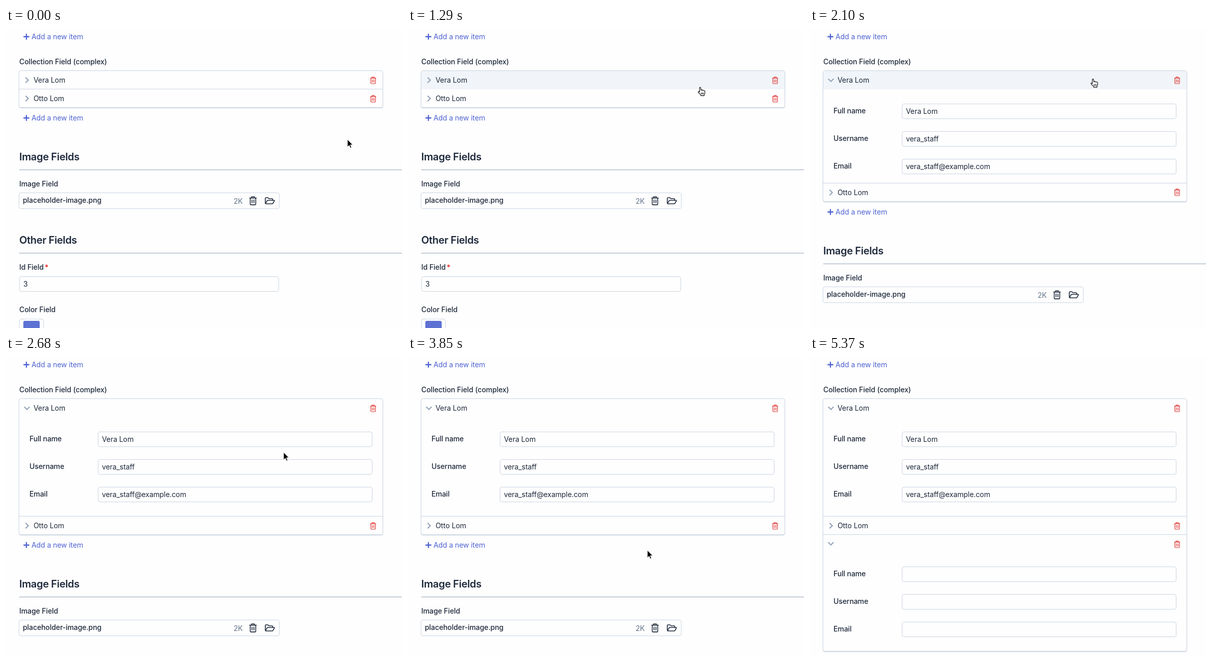
An HTML page that plays this animation: 776 px wide and 587 px high, repeating every 6.72 s.

```html
<!DOCTYPE html>
<html lang="en">
<head>
<meta charset="utf-8">
<title>Collection field</title>
<style>
  * { box-sizing: border-box; }
  html, body { margin: 0; width: 100%; height: 100%; overflow: hidden; }
  body {
    position: relative;
    padding: 83px 0 0 25px;
    background: #fefefe;
    color: #1e293b;
    font: 400 14px/20px Inter, "Open Sans", sans-serif;
    font-optical-sizing: none;
    letter-spacing: -.006em;
    white-space: nowrap;
    cursor: default;
  }
  svg { position: absolute; overflow: visible; fill: none; stroke: currentColor; }
  .label, .add, h2, hr, .input, .icon, .size, .swatch, .dot { position: absolute; margin: 0; }
  .label { font-weight: 500; }
  h2 { font-size: 20px; font-weight: 600; line-height: 28px; letter-spacing: -.017em; }
  hr { left: 1px; width: 760px; height: 1px; border: 0; background: #94a3b8; }

  .add { left: 9px; height: 20px; padding-left: 16px; color: #4f63d2; }
  .add svg { left: 0; top: 4px; width: 12px; height: 12px; stroke-width: 2.3; }
  .add.hover { color: #3a489f; }

  #list {
    position: relative;
    width: 714px;
    border: 1px solid #cbd5e1;
    border-radius: 4px;
    box-shadow: 0 1px 1px #cbd5e1;
  }
  .item + .item, #slot .item { border-top: 1px solid #cbd5e1; }
  #slot { overflow: hidden; max-height: 0; }
  .head { position: relative; height: 36px; margin-bottom: -1px; padding: 8px 28px; }
  #slot .head { height: 34px; }
  .head.hover { background: #f1f5f9; }
  .item:first-child > .head { border-radius: 3px 3px 0 0; }
  .chevron { left: 9px; top: 12px; width: 12px; height: 12px; color: #94a3b8; stroke-width: 2.1; }
  #slot .chevron { top: 11px; }
  .bin { left: 686.5px; top: 10.5px; width: 13px; height: 15px; color: #e0322f; stroke-width: 1.3; }
  .panel { position: relative; height: 0; overflow: hidden; }
  .panel .label { left: 20px; }
  .panel .input { left: 154px; width: 538px; }

  .input { height: 30px; padding-left: 7px; border: 1px solid #cbd5e1; border-radius: 4px; line-height: 28px; }
  #rest { position: relative; }
  #rest > .label, #rest > h2 { left: 1px; }
  .file { left: 0; top: 166px; width: 511px; height: 32px; font-weight: 500; }
  .size { left: 421px; top: 173px; color: #64748b; }
  .swatch { left: 1px; top: 413px; width: 48px; height: 30px; border: 1px solid #cbd5e1; border-radius: 4px; }
  .swatch::after { content: ""; position: absolute; left: 7px; top: 3px; width: 32px; height: 22px; border-radius: 3px; background: #5e72d4; }
  .dot { left: 52px; top: 307px; width: 5px; height: 5px; border-radius: 50%; background: #ef5350; }

  #cursor { position: absolute; left: 0; top: 0; pointer-events: none; }
  #cursor svg { display: none; left: 0; top: 0; width: 1px; height: 1px; }
  #cursor[data-kind=arrow] .arrow,
  #cursor[data-kind=hand] .hand,
  #cursor[data-kind=beam] .beam { display: block; }
  .arrow { fill: #000; stroke: #fff; }
  .hand { fill: #fff; stroke: #000; stroke-width: 1.1; stroke-linejoin: round; }
  .beam { stroke: #222; }
</style>
</head>
<body>
<svg width="0" height="0">
  <symbol id="bin" viewBox="0 0 14 16">
    <path d="M.8 3.2h12.4M4.6 3V1.1h4.8V3M2.2 3.5v10.2q0 1.3 1.3 1.3h7q1.3 0 1.3-1.3V3.5M5.4 6v6.3M8.6 6v6.3"/>
  </symbol>
  <symbol id="plus" viewBox="0 0 12 12"><path d="M6 .3v11.4M.3 6h11.4"/></symbol>
</svg>

<div class="add" style="top:7px;left:34px"><svg><use href="#plus"/></svg>Add a new item</div>
<div class="label" style="top:56px;left:26px">Collection Field (complex)</div>

<div id="list"></div>

<div id="rest">
  <div class="add" style="top:10px"><svg><use href="#plus"/></svg>Add a new item</div>

  <h2 style="top:82px">Image Fields</h2>
  <hr style="top:121px">
  <div class="label" style="top:139px">Image Field</div>
  <div class="input file">placeholder-image.png</div>
  <div class="size">2K</div>
  <svg style="left:451px;top:173px;width:16px;height:18px;stroke-width:1.4"><use href="#bin"/></svg>
  <svg viewBox="0 0 20 14" style="left:482px;top:175px;width:20px;height:14px;stroke-width:1.6">
    <path d="M1.2 12V2.2Q1.2 1 2.4 1h3.8l2 2h6.2q1.2 0 1.2 1.2V6M1.5 12.6l3-5.4q.5-1 1.6-1h12.2q1.2 0 .6 1l-2.7 4.8q-.6 1-1.7 1H2.4q-1.2 0-1.2-1.2"/>
  </svg>

  <h2 style="top:245px">Other Fields</h2>
  <hr style="top:284px">
  <div class="label" style="top:302px">Id Field</div>
  <div class="dot"></div>
  <div class="input" style="left:1px;top:330px;width:509px">3</div>
  <div class="label" style="top:385px">Color Field</div>
  <div class="swatch"></div>
</div>

<div id="cursor" data-kind="arrow">
  <svg class="arrow"><path d="M0 0v15l3.5-3.3 2.3 5.2 2.4-1-2.3-5.1h4.7z"/></svg>
  <svg class="hand"><path transform="translate(-4.5 -.5)" d="M3.8 10V2q-.1-1.3 1-1.4t1.4 1.3l.5 4.6q.2-1.1 1.2-1.1 1.2 0 1.4 1.4.2-.9 1.2-.8 1.1 0 1.3 1.3.2-.7 1-.6 1.3.1 1.4 1.6v2.9q0 2.1-1.4 3.7v2H6.4v-1.5Q4 13.6 1.6 10.6.7 9.2 1.5 8.7q.9-.5 2.3 1.3zM7.2 11v3M9.2 11v3M11.2 11v3"/></svg>
  <svg class="beam"><path d="M-3-8q2.5 0 3 2 .5-2 3-2M0-6V6M-3 8q2.5 0 3-2 .5 2 3 2M-1.5 2h3"/></svg>
</div>

<script>
  const LOOP = 6720, STEP = 1000 * 7 / 120;
  const $ = sel => document.querySelector(sel);

  const field = (label, value, i) => `
    <div class="label" style="top:${33 + 54 * i}px">${label}</div>
    <div class="input" style="top:${29 + 54 * i}px">${value}</div>`;

  const item = (id, name, user = '', mail = '') => `
    <div class="item" id="${id}">
      <div class="head">${name}
        <svg class="chevron" viewBox="0 0 12 12"><path d="M3.3.8 8.7 6 3.3 11.2"/></svg>
        <svg class="bin"><use href="#bin"/></svg>
      </div>
      <div class="panel">${
        field('Full name', name, 0) + field('Username', user, 1) + field('Email', mail, 2)
      }</div>
    </div>`;

  $('#list').innerHTML =
    item('first', 'Vera Lom', 'vera_staff', 'vera_staff@example.com') +
    item('second', 'Otto Lom') +
    `<div id="slot">${item('third', '')}</div>`;

  // Each track is a list of [ms, properties, easing towards the next entry].
  const tracks = [];
  function track(sel, stops) {
    const full = [[0, stops[0][1]], ...stops, [LOOP, stops.at(-1)[1]]];
    const frames = full.map(([ms, props, easing = 'linear']) => ({ offset: ms / LOOP, easing, ...props }));
    const anim = $(sel).animate(frames, { duration: LOOP, fill: 'both' });
    anim.pause();
    tracks.push(anim);
  }

  function expand(id, start) {
    track(`#${id} .panel`, [
      [start, { height: '0px' }, 'ease'],
      [start + 350, { height: '194px' }]
    ]);
    track(`#${id} .chevron`, [
      [start, { transform: 'rotate(0deg)' }, 'ease'],
      [start + 250, { transform: 'rotate(90deg)' }]
    ]);
  }

  const OPENED = 4905;
  const at = (ms, x, y, easing) => [ms, { transform: `translate(${x}px, ${y}px)` }, easing];

  expand('first', 1853);
  expand('third', 5003);
  track('#slot', [
    [OPENED, { maxHeight: '0px' }, 'step-end'],
    [OPENED + 1, { maxHeight: '300px' }]
  ]);
  track('#cursor', [
    at(725, 669, 218, 'cubic-bezier(.35,.1,.6,.85)'),
    at(1287, 572, 116),
    at(1403, 562.5, 106.5, 'ease-out'),
    at(1578, 554, 99.5),
    at(2520, 554, 99.5, 'cubic-bezier(.4,0,.8,.8)'),
    at(2686, 544, 188, 'cubic-bezier(.2,.5,.6,.9)'),
    at(3211, 503, 303, 'cubic-bezier(.3,.2,.6,.9)'),
    at(3853, 469, 380),
    at(3912, 469, 382, 'ease-in'),
    at(4300, 290, 399, 'ease-out'),
    at(4611, 97, 381),
    at(4668, 95, 378)
  ]);

  const snap = t => t < 780 ? 0 : 1870 + Math.floor((t - 1860) / STEP) * STEP;

  const cursor = $('#cursor');
  const targets = document.querySelectorAll('.head, .add');

  function point(t) {
    const shown = t < OPENED;
    const { e: x, f: y } = new DOMMatrix(getComputedStyle(cursor).transform);
    const hit = shown ? document.elementFromPoint(x, y) : null;
    const target = hit?.closest('.head, .add');
    targets.forEach(el => el.classList.toggle('hover', el === target));
    cursor.dataset.kind = !shown ? 'none' : target ? 'hand' : hit?.closest('.input') ? 'beam' : 'arrow';
  }

  const begin = performance.now();
  function draw() {
    const t = snap((performance.now() - begin) % LOOP);
    tracks.forEach(anim => { anim.currentTime = t; });
    point(t);
    requestAnimationFrame(draw);
  }
  draw();
</script>
</body>
</html>
```
